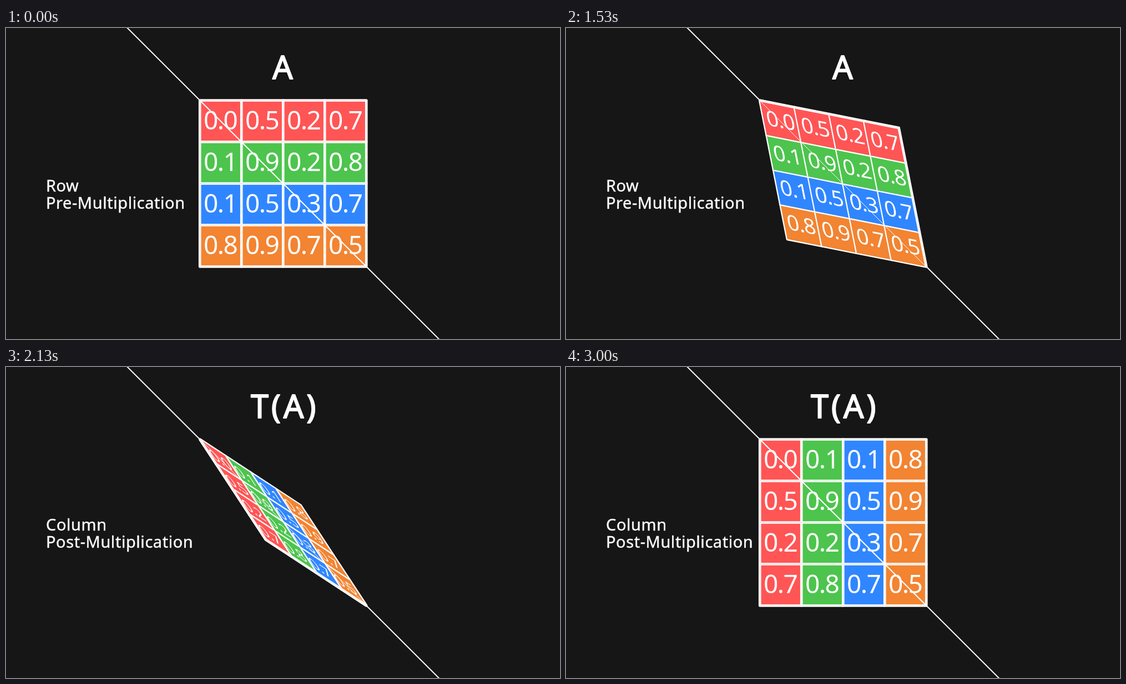
Recreate the animation shown at these times as an HTML page with a canvas. Size 998 by 561 pixels, loop 4.03 s.

```html
<!DOCTYPE html>
<html lang="en">
<head>
<meta charset="utf-8">
<title>Matrix transpose</title>
<style>
  html, body { margin: 0; width: 100%; height: 100%; overflow: hidden; background: #161616; }
  canvas { display: block; }
</style>
</head>
<body>
<canvas id="stage" width="998" height="561"></canvas>
<script>
const ctx = document.getElementById("stage").getContext("2d");
const LOOP = 4030, FPS = 30;
const START = 30, SWAP = 60, END = 90;   // frames of the half turn
const CENTER = { x: 499.2, y: 280.5 };
const CELL = 75, HALF = 2 * CELL;
const GRID_LINE = 4.6, AXIS_LINE = 2;
const FONT = '"Noto Sans", "Open Sans", sans-serif';
const TITLE = { size: 57.5, spacing: 4.8, outline: 1.8 };
const CAPTION = { size: 29, spacing: 0.55, outline: 0.4 };
const NUMBER = { size: 46, spacing: -1.5, outline: 0 };
const COLORS = ["#ff5555", "#4dc44d", "#3086ff", "#f28432"];
const MATRIX = [
  ["0.0", "0.5", "0.2", "0.7"],
  ["0.1", "0.9", "0.2", "0.8"],
  ["0.1", "0.5", "0.3", "0.7"],
  ["0.8", "0.9", "0.7", "0.5"],
];

function trace(points, closed) {
  ctx.beginPath();
  for (const [x, y] of points) ctx.lineTo(x, y);
  if (closed) ctx.closePath();
}

function strokeLine(points, width, closed = false) {
  trace(points, closed);
  ctx.lineWidth = width;
  ctx.stroke();
}

function label(text, x, y, { size, spacing, outline }) {
  ctx.font = `${size}px ${FONT}`;
  ctx.letterSpacing = spacing + "px";
  ctx.fillText(text, x, y);
  if (outline) {
    ctx.lineWidth = outline;
    ctx.strokeText(text, x, y);
  }
}

function drawLabels(transposed) {
  ctx.fillStyle = "#fff";
  ctx.textAlign = "left";
  label(transposed ? "T(A)" : "A", transposed ? 441 : 480, 92, TITLE);
  label(transposed ? "Column" : "Row", 72, 295, CAPTION);
  label((transposed ? "Post" : "Pre") + "-Multiplication", 72, 325.5, CAPTION);
}

function drawGrid(squeeze, transposed, flat) {
  // Squeezing across the main diagonal is a symmetric 2x2 matrix.
  const a = (1 + squeeze) / 2, b = (1 - squeeze) / 2;
  const project = (x, y) => [CENTER.x + a * x + b * y, CENTER.y + b * x + a * y];
  const cells = [];
  for (let row = 0; row < 4; row++) {
    for (let col = 0; col < 4; col++) {
      const x = col * CELL - HALF, y = row * CELL - HALF;
      cells.push({
        x, y,
        color: COLORS[transposed ? col : row],
        text: transposed ? MATRIX[col][row] : MATRIX[row][col],
        corners: [project(x, y), project(x + CELL, y),
                  project(x + CELL, y + CELL), project(x, y + CELL)],
      });
    }
  }

  for (const cell of cells) strokeLine(cell.corners, GRID_LINE, true);

  // A tilted cell hides the inner half of the two borders lying behind it.
  for (const { corners: [tl, tr, br, bl], color } of cells) {
    ctx.save();
    trace([tl, tr, br, bl], true);
    ctx.fillStyle = color;
    ctx.fill();
    ctx.clip();
    if (flat || !transposed) strokeLine([tl, tr, br], GRID_LINE);
    if (flat || transposed) strokeLine([tl, bl, br], GRID_LINE);
    ctx.restore();
  }

  ctx.save();
  ctx.transform(a, b, b, a, CENTER.x, CENTER.y);
  ctx.fillStyle = "#fff";
  ctx.textAlign = "center";
  for (const { x, y, text } of cells) label(text, x + CELL / 2 - 0.5, y + 52.5, NUMBER);
  ctx.restore();
}

function drawAxis(reach, width, shift = 0) {
  const { x, y } = CENTER;
  strokeLine([[x - reach - shift, y - reach + shift],
              [x + reach - shift, y + reach + shift]], width);
}

function draw(time) {
  const frame = Math.floor((time + 3.5) * FPS / 1000);
  const turn = Math.min(Math.max((frame - START) / (END - START), 0), 1);
  const flat = turn === 0 || turn === 1;
  const transposed = frame >= SWAP;

  ctx.fillStyle = "#161616";
  ctx.fillRect(0, 0, 998, 561);
  ctx.strokeStyle = "#fff";
  ctx.lineJoin = "round";
  drawLabels(transposed);
  drawAxis(300, AXIS_LINE);
  drawGrid(Math.abs(Math.cos(turn * Math.PI)), transposed, flat);
  if (flat) drawAxis(HALF, AXIS_LINE);
  else drawAxis(HALF, AXIS_LINE / 2, transposed ? -0.35 : 0.35);
}

const begin = performance.now();
function tick() {
  draw((performance.now() - begin) % LOOP);
  requestAnimationFrame(tick);
}
tick();
</script>
</body>
</html>
```
